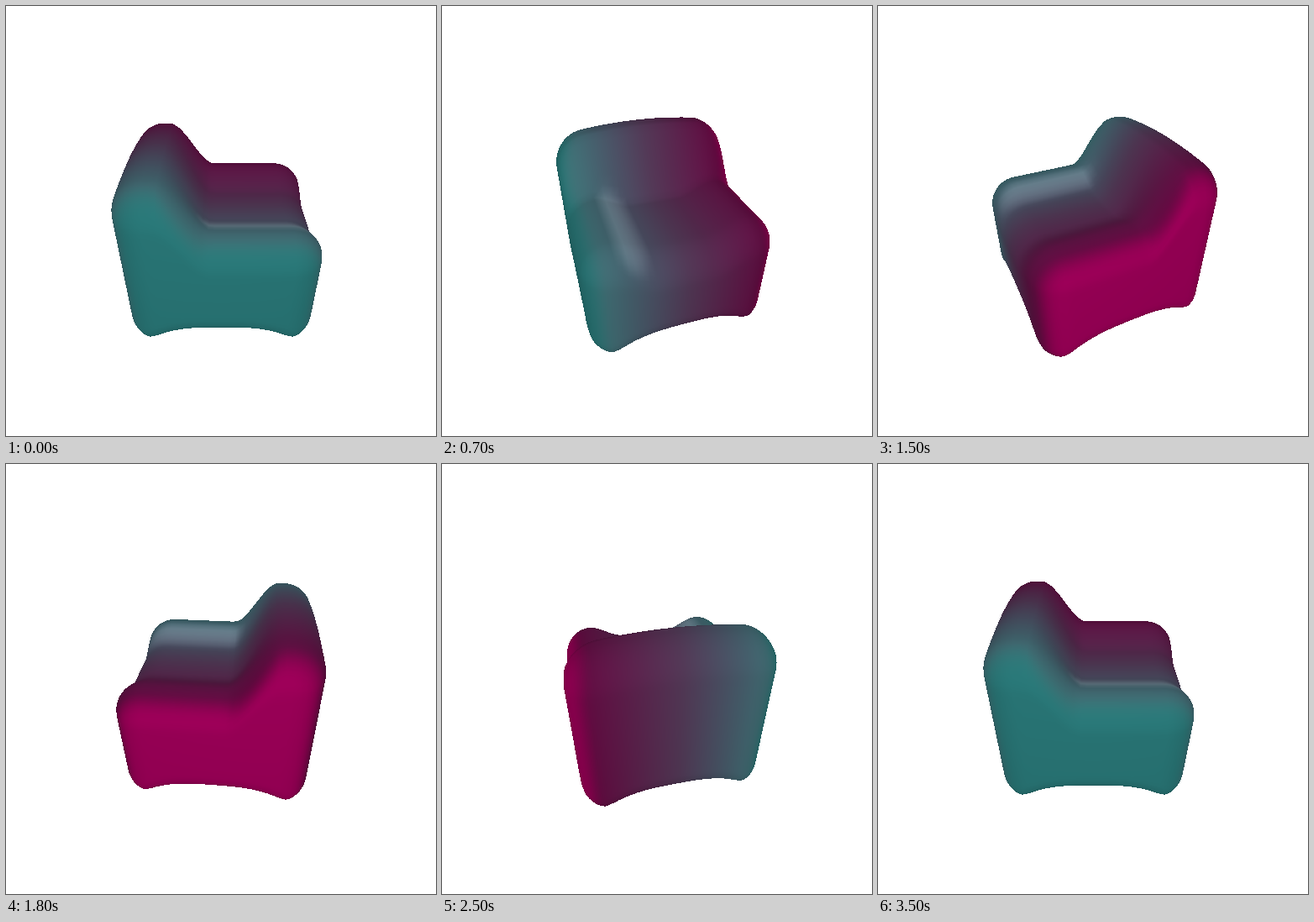
Recreate the animation shown at these times as an HTML page with a canvas. Size 512 by 512 pixels, loop 3.6 s.

```html
<!DOCTYPE html>
<html lang="en">
<head>
<meta charset="utf-8">
<title>Turning seat</title>
<style>
html, body { margin: 0; width: 100%; height: 100%; overflow: hidden; background: #fff; }
canvas { display: block; width: 512px; height: 512px; }
</style>
</head>
<body>
<canvas id="stage" width="512" height="512"></canvas>
<script>
const SIZE = 512, STEP = 100, STEPS = 36;
const HALF = 0.82, ROUND = 0.27, CELLS = 32;
const DIST = 3.5, FOCAL = 438, TILT = 35 * Math.PI / 180;
const SIN = Math.sin(TILT), COS = Math.cos(TILT);

const ctx = document.getElementById('stage').getContext('2d');
const image = ctx.createImageData(SIZE, SIZE);
const pixels = new Uint32Array(image.data.buffer);
const depth = new Float32Array(SIZE * SIZE);

const clamp = (x, lo, hi) => Math.min(hi, Math.max(lo, x));
const smooth = (lo, hi, x) => {
  const k = clamp((x - lo) / (hi - lo), 0, 1);
  return k * k * (3 - 2 * k);
};
const mix = (a, b, k) => a.map((x, i) => x + (b[i] - x) * k);
const sub = (a, b) => a.map((x, i) => x - b[i]);
const dot = (a, b) => a[0] * b[0] + a[1] * b[1] + a[2] * b[2];
const unit = a => { const l = Math.hypot(...a); return a.map(x => x / l); };
const cross = (a, b) => [
  a[1] * b[2] - a[2] * b[1], a[2] * b[0] - a[0] * b[2], a[0] * b[1] - a[1] * b[0]
];

// Rounded cube with a step cut into the top and feet at the corners.
// Axes: across (teal is positive), forward (seat is positive), up.
function shape(q) {
  const core = HALF - ROUND;
  const outer = q.map(x => x * HALF);
  const inner = outer.map(x => clamp(x, -core, core));
  const n = unit(sub(outer, inner));
  const [x, y, z] = inner.map((c, i) => c + ROUND * n[i]);
  const back = 1 - smooth(-0.5, -0.08, y);
  const seat = -0.64 + 0.13 * smooth(0.22, 0.58, Math.abs(x));
  const crest = -0.03 - 0.12 * x * x;
  const drop = seat + back * (crest - seat);
  const foot = s => Math.min(1, Math.abs(s) / 0.65) ** 3;
  const lift = 0.16 * (1 - foot(x) * foot(y)) - 0.04;
  return [x, y, z + drop * clamp((z + 0.4) / 0.9, 0, 1) + lift * clamp(-z / core, 0, 1)];
}

const TEAL = [62, 124, 126], MIDDLE = [84, 58, 88], WINE = [104, 4, 64];
const TEAL_END = [42, 122, 122], PINK_END = [160, 0, 90];
function tint([x], [nx]) {
  const side = x < 0 ? WINE : TEAL, end = x < 0 ? PINK_END : TEAL_END;
  const across = Math.min(1, Math.abs(x) / 0.8);
  const inward = smooth(0.15, 0.5, -Math.sign(x) * nx);
  const glow = 45 * inward * smooth(0, 0.6, x);
  return mix(mix(MIDDLE, side, across), end, smooth(0.3, 0.95, nx * Math.sign(x)))
    .map(v => v + glow);
}

const vertices = [], triangles = [];
function buildSide(axis, sign) {
  const at = (a, b) => {
    const q = [0, 0, 0];
    q[axis] = sign;
    q[(axis + 1) % 3] = a;
    q[(axis + 2) % 3] = b * sign;
    return shape(q);
  };
  const start = vertices.length, row = CELLS + 1, e = 0.01;
  for (let j = 0; j < row; j++)
    for (let i = 0; i < row; i++) {
      const a = 2 * i / CELLS - 1, b = 2 * j / CELLS - 1;
      const point = at(a, b);
      const normal = unit(cross(
        sub(at(a + e, b), at(a - e, b)), sub(at(a, b + e), at(a, b - e))));
      vertices.push({ point, normal, color: tint(point, normal) });
    }
  for (let j = 0; j < CELLS; j++)
    for (let i = 0; i < CELLS; i++) {
      const k = start + j * row + i;
      triangles.push([k, k + 1, k + row + 1], [k, k + row + 1, k + row]);
    }
}
for (const axis of [0, 1, 2]) for (const sign of [-1, 1]) buildSide(axis, sign);

function fillTriangle(a, b, c) {
  const area = (b.x - a.x) * (c.y - a.y) - (b.y - a.y) * (c.x - a.x);
  if (Math.abs(area) < 1e-6) return;
  const left = Math.ceil(Math.min(a.x, b.x, c.x)), right = Math.max(a.x, b.x, c.x);
  const top = Math.ceil(Math.min(a.y, b.y, c.y)), bottom = Math.max(a.y, b.y, c.y);
  for (let y = top; y <= bottom; y++)
    for (let x = left; x <= right; x++) {
      const u = ((x - a.x) * (c.y - a.y) - (y - a.y) * (c.x - a.x)) / area;
      const v = ((b.x - a.x) * (y - a.y) - (b.y - a.y) * (x - a.x)) / area;
      const w = 1 - u - v;
      if (u < -1e-6 || v < -1e-6 || w < -1e-6) continue;
      const near = w * a.near + u * b.near + v * c.near;
      const at = y * SIZE + x;
      if (near <= depth[at]) continue;
      depth[at] = near;
      const channel = i => w * a.rgb[i] + u * b.rgb[i] + v * c.rgb[i] + 0.5 | 0;
      pixels[at] = 0xff000000 | channel(2) << 16 | channel(1) << 8 | channel(0);
    }
}

function draw(step) {
  const angle = 2 * Math.PI * step / (STEPS - 1);
  const c = Math.cos(angle), s = Math.sin(angle);
  const eye = [DIST * COS * c, DIST * COS * s, DIST * SIN];
  const placed = vertices.map(({ point, normal, color }) => {
    const [x, y, z] = point;
    const right = y * c - x * s, front = y * s + x * c;
    const near = 1 / (DIST - front * COS - z * SIN);
    const facing = Math.max(0, dot(normal, unit(sub(eye, point))));
    const shade = 0.76 + 0.24 * facing;
    return {
      x: SIZE / 2 + FOCAL * near * right,
      y: SIZE / 2 + FOCAL * near * (front * SIN - z * COS),
      near, rgb: color.map(v => v * shade)
    };
  });
  pixels.fill(0xffffffff);
  depth.fill(0);
  for (const t of triangles) fillTriangle(...t.map(i => placed[i]));
  ctx.putImageData(image, 0, 0);
}

let shown = -1;
const begin = performance.now();
function tick() {
  const step = Math.floor((performance.now() - begin) / STEP) % STEPS;
  if (step !== shown) draw(shown = step);
  requestAnimationFrame(tick);
}
tick();
</script>
</body>
</html>
```
